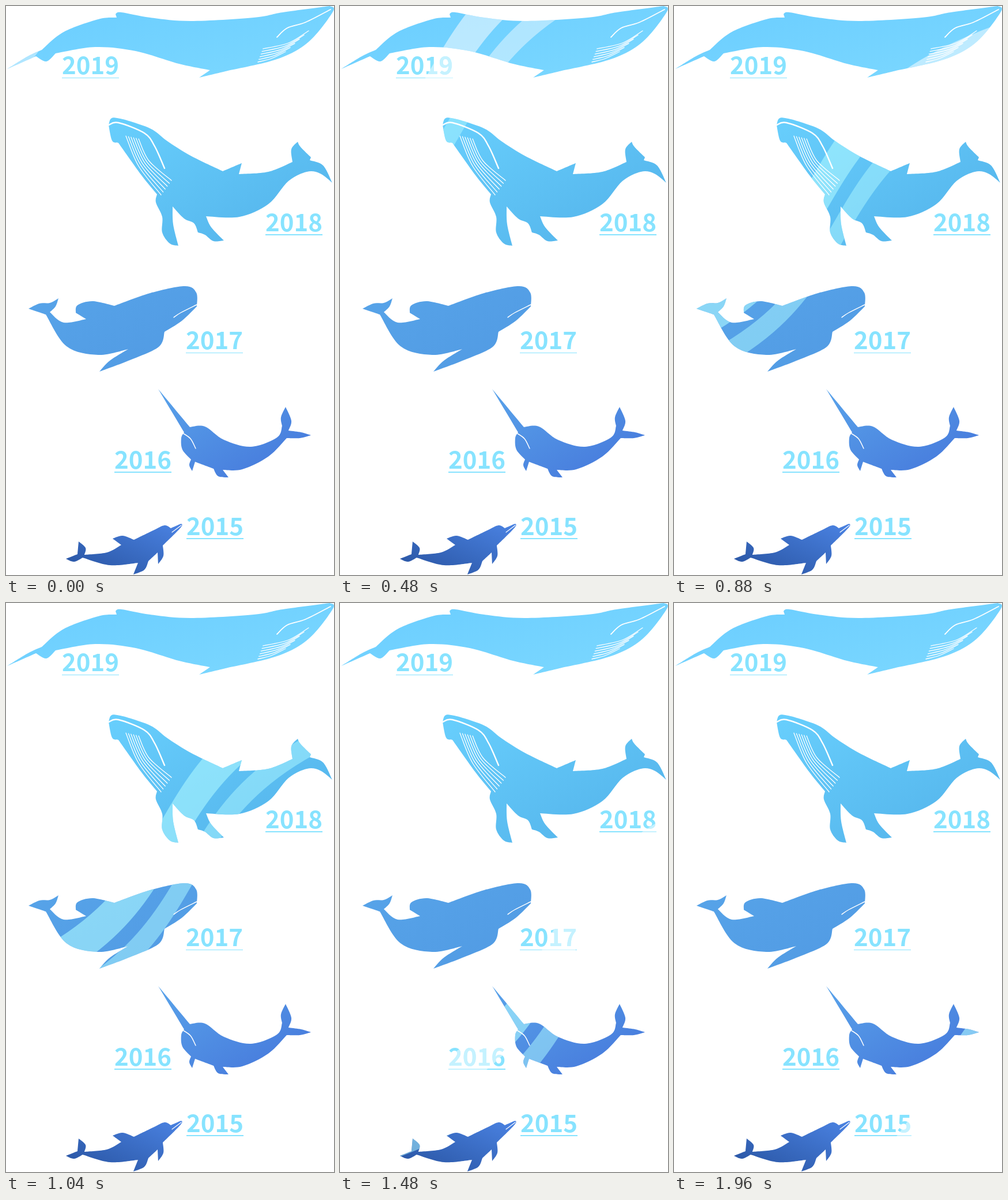
An HTML page that plays this animation: 569 px wide and 985 px high, repeating every 2 s.

```html
<!DOCTYPE html>
<html lang="en">
<head>
<meta charset="utf-8">
<title>Whales by year</title>
<style>
html, body { margin: 0; width: 100%; height: 100%; overflow: hidden; background: #fff; }
svg { display: block; width: 100%; height: 100%; }
text { font: 700 42px "Noto Sans CJK SC", "Noto Sans CJK JP", "Noto Sans CJK", "Noto Sans", sans-serif; }
rect { shape-rendering: crispEdges; }
.line { fill: none; stroke: #fff; stroke-linecap: round; }
</style>
</head>
<body>
<svg id="stage" viewBox="0 0 569 985"></svg>
<script>
// Key points joined by smooth curves; "|" marks a corner. A fan blends its first line into its last.
const whales = [
  { id: 'blue', colors: ['#6acdff', '#7cd8ff'],
    outline: `2,109 38,87 62,76|100,45 160,23 192,20|190,14|200,11 250,20 320,26 430,20 480,11 562,0|
      567,10 525,62 470,92 385,112|335,124|354,111|300,100 225,78 155,71 86,82|70,96 52,87|2,109`,
    mouth: '563,6 520,28 488,38 470,54', width: 1.8,
    fan: ['525,43 490,64 446,74', '485,79 460,91 437,97'] },
  { id: 'humpback', colors: ['#68cffd', '#52b1e9'],
    outline: `178,206 182,195 193,194 220,201 254,214 280,234 320,259 376,286|409,272|404,291|455,287 497,270|
      495,248 506,235|511,244 529,262|527,267|550,276 566,306|545,290 522,287 490,303 455,343 405,365 347,364|
      356,383 378,406|360,407 345,396 333,392|326,376 309,368 289,347|290,378 299,415|
      284,411 271,392 271,365 260,340 262,326|235,293 195,237|184,233 178,206`,
    mouth: '178,206 195,202 240,220 258,243 275,281', width: 2.4,
    fan: ['208,225 230,277 269,327', '230,230 248,268 287,302'] },
  { id: 'pilot', colors: ['#57a4e9', '#519ae3'],
    outline: `39,524 58,515 76,514 91,506|86,520 76,530|100,548 139,542|121,531|124,518 150,511 188,519|
      250,497 310,485 330,496 331,520|305,545 275,564|265,590 215,613 162,633|180,614 212,594|
      160,604 105,589 69,534|39,524`,
    mouth: '331,517 303,531 291,539', width: 1.4 },
  { id: 'narwhal', colors: ['#59a3ea', '#4474da'],
    outline: `264,663|319,729|345,728 378,751 425,763 470,747 479,727|477,712 485,694|495,718 490,735|
      512,738 529,743|510,748 487,748|455,780 410,802 376,803|386,816|368,814 360,801|328,789|323,805|
      318,795 321,785|306,768 304,748 309,738|264,663`,
    mouth: '306,739 320,749 329,766', width: 1.5 },
  { id: 'dolphin', colors: ['#4b83e3', '#27529f'], flip: true,
    outline: `104,957|124,949|126,927|138,938 136,950|175,946 200,933|185,922|202,917 222,924|
      255,908 275,899 286,904|304,896|303,903 272,934|273,952 264,966|263,946|247,961|240,976 221,984|
      229,964|180,968 133,955|118,962 104,957`,
    mouth: '304,899 288,911', width: 1.2 }
];
// Year, left end and top of its underline.
const years = [[2019, 97, 123.6], [2018, 450, 395.4], [2017, 312, 599.6], [2016, 188, 806.2], [2015, 313, 921.2]];

const parse = s => s.trim().split(/\s+/).map(p => p.split(',').map(Number));

function curve(pts) {
  let d = '';
  for (let i = 0; i + 1 < pts.length; i++) {
    const p = pts[i], q = pts[i + 1], before = pts[i - 1] || p, after = pts[i + 2] || q;
    const a = p.map((v, k) => v + (q[k] - before[k]) / 6);
    const b = q.map((v, k) => v - (after[k] - p[k]) / 6);
    d += `C${a} ${b} ${q}`;
  }
  return d;
}

function smooth(s) {
  let last, d = '';
  for (const part of s.split('|')) {
    const pts = parse(part);
    d += last ? curve([last, ...pts]) : `M${pts[0]}` + curve(pts);
    last = pts[pts.length - 1];
  }
  return d;
}

// One S-shaped edge of the sweep, as it lies at 880 ms.
function edge(offset) {
  const pts = [];
  for (let y = -450; y <= 450; y += 10)
    pts.push([236 - 70 * Math.sinh(y / 121) + offset * .57, 303 + y + offset]);
  return pts;
}

const band = (near, far) => `M${edge(near).concat(edge(far).reverse()).join('L')}Z`;
const wide = band(0, 50), narrow = band(72, 102);
const sweep = (clip, color, strong, weak) => `<g clip-path="url(#${clip})" fill="${color}"><g class="sweep">
  <path d="${wide}" opacity="${strong}"/><path d="${narrow}" opacity="${weak}"/></g></g>`;

const stroke = (d, width) => `<path class="line" d="${d}" stroke-width="${width}"/>`;

function grooves([first, last], count = 6) {
  const a = parse(first), b = parse(last);
  return Array.from({ length: count }, (_, i) => {
    const pts = a.map((p, j) => p.map((v, k) => v + (b[j][k] - v) * i / (count - 1)));
    return stroke(`M${pts[0]}${curve(pts)}`, 1.3);
  }).join('');
}

const use = id => `<use href="#${id}"/>`;
const ids = whales.map(w => w.id);

const gradients = whales.map(({ id, colors, flip }) =>
  `<linearGradient id="${id}-fill" x1="${flip ? 1 : 0}" y1="0" x2="${flip ? 0 : 1}" y2="1">
  <stop stop-color="${colors[0]}"/><stop offset="1" stop-color="${colors[1]}"/></linearGradient>`).join('');
const bodies = whales.map(w => `<path id="${w.id}" d="${smooth(w.outline)}Z" fill="url(#${w.id}-fill)"/>`).join('');
const lines = whales.map(w => stroke(smooth(w.mouth), w.width) + (w.fan ? grooves(w.fan) : '')).join('');
const labels = years.map(([year, x, y]) => `<text id="y${year}" x="${x}" y="${y - 5.5}">${year}</text>
  <rect id="u${year}" x="${x}" y="${y}" width="99" height="1.5"/>`).join('');

document.getElementById('stage').innerHTML = `<defs>${gradients}
  <clipPath id="pale">${use(ids[0])}${years.map(([y]) => use('y' + y) + use('u' + y)).join('')}</clipPath>
  <clipPath id="deep">${ids.slice(1).map(use).join('')}</clipPath></defs>
  ${bodies}<g fill="#87e3ff">${labels}</g>
  ${sweep('pale', '#fff', .52, .44)}${sweep('deep', '#a8f4ff', .64, .54)}${lines}`;

const sweeps = document.querySelectorAll('.sweep');
const began = performance.now();
function draw() {
  const t = Math.floor((performance.now() - began) % 2000 / 40) * 40 - 880;
  sweeps.forEach(g => g.setAttribute('transform', `translate(${t * .2} ${t * .48})`));
  requestAnimationFrame(draw);
}
draw();
</script>
</body>
</html>
```
